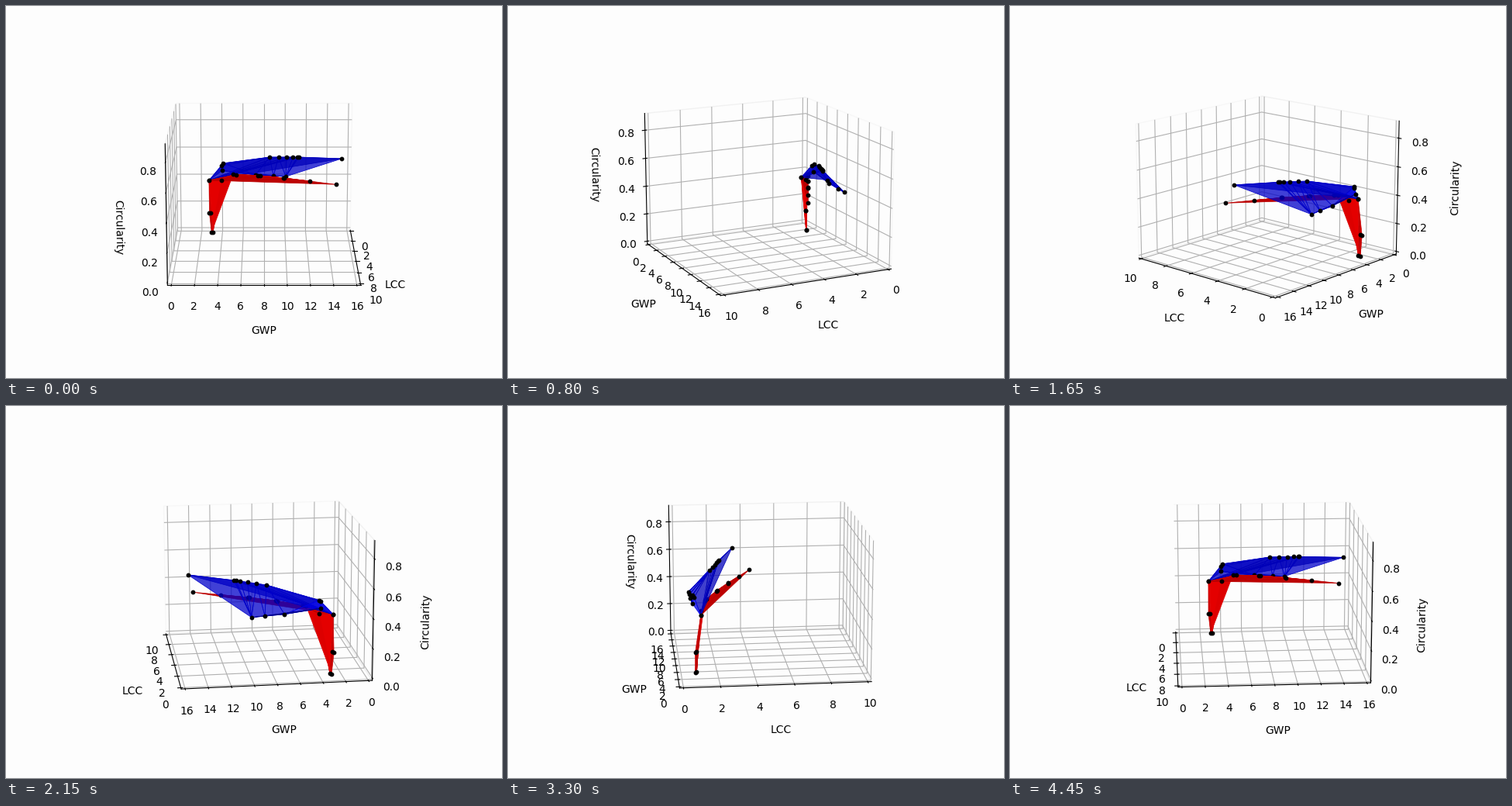
Animation of 640 by 480 pixels, one loop 4.5 s. Source, as a matplotlib script:

```python
import numpy as np
import matplotlib.pyplot as plt
from matplotlib.animation import FuncAnimation

FRAMES, INTERVAL = 90, 50
BACKGROUND = "#fdfdfd"
plt.rcParams["axes3d.automargin"] = True


def between(start, end, t):
    """Points on a segment at the fractions t, one row each."""
    start, end = np.array(start), np.array(end)
    return start + np.reshape(t, (-1, 1)) * (end - start)


# Points are (LCC, GWP, Circularity); both fronts share one corner.
corner = (1.09, 2.80, 0.395)


def red_front():
    stem = np.array([(0.765, 2.98, 0.0), (0.765, 2.79, 0.144)])
    shoulder = (1.17, 4.01, 0.400)
    t = np.linspace(0, 1, 5)
    chain = between((1.41, 5.10, 0.471), (4.435, 14.52, 0.471), t)
    chain[:, 2] -= 0.022 * (1 - t) ** 4
    # Each point has a close twin; along the chain the gap shrinks to nothing.
    stem_twins = stem + (0.08, 0.14, 0.003)
    chain_twins = chain + np.outer((1 - t) ** 2, (0.10, 0.27, 0.001))
    return np.vstack([stem, stem_twins, corner, shoulder,
                      chain, chain_twins[:3]])


def blue_front():
    knot = between((0.674, 4.04, 0.453), (0.695, 4.15, 0.508), (0, 0.75, 1))
    knot[1] += (0.10, -0.15, 0)
    rim = between((0.688, 7.19, 0.422), (0.685, 10.06, 0.410),
                  np.linspace(0, 1, 3) ** 0.75)
    ridge = between((1.828, 8.505, 0.586), (2.47, 11.20, 0.605),
                    np.sin(np.linspace(0, np.pi / 2, 6)))
    tip = (3.449, 15.10, 0.623)
    return np.vstack([corner, knot, rim, ridge, tip])


def draw_front(ax, points, color, alpha):
    ax.plot_trisurf(*points.T, color=color, edgecolors=color,
                    linewidth=0.5, alpha=alpha)
    ax.scatter(*points.T, color="black", s=10, depthshade=False)


fig = plt.figure(figsize=(6.4, 4.8), dpi=100, facecolor=BACKGROUND)
ax = fig.add_subplot(projection="3d", facecolor=BACKGROUND)
draw_front(ax, red_front(), "red", 1)
draw_front(ax, blue_front(), "blue", 0.75)

ax.set(xlim=(0, 10), ylim=(0, 16), zlim=(0, 0.9))
ax.set_xlabel("LCC", labelpad=10)
ax.set_ylabel("GWP", labelpad=10)
ax.set_zlabel("Circularity", labelpad=10)
for axis in (ax.xaxis, ax.yaxis, ax.zaxis):
    axis.pane.fill = False


def update(i):
    ax.view_init(elev=15, azim=i * 360 / FRAMES)
    return []


anim = FuncAnimation(fig, update, frames=FRAMES, interval=INTERVAL,
                     init_func=lambda: update(0), repeat=True, repeat_delay=0)
plt.show()
```
